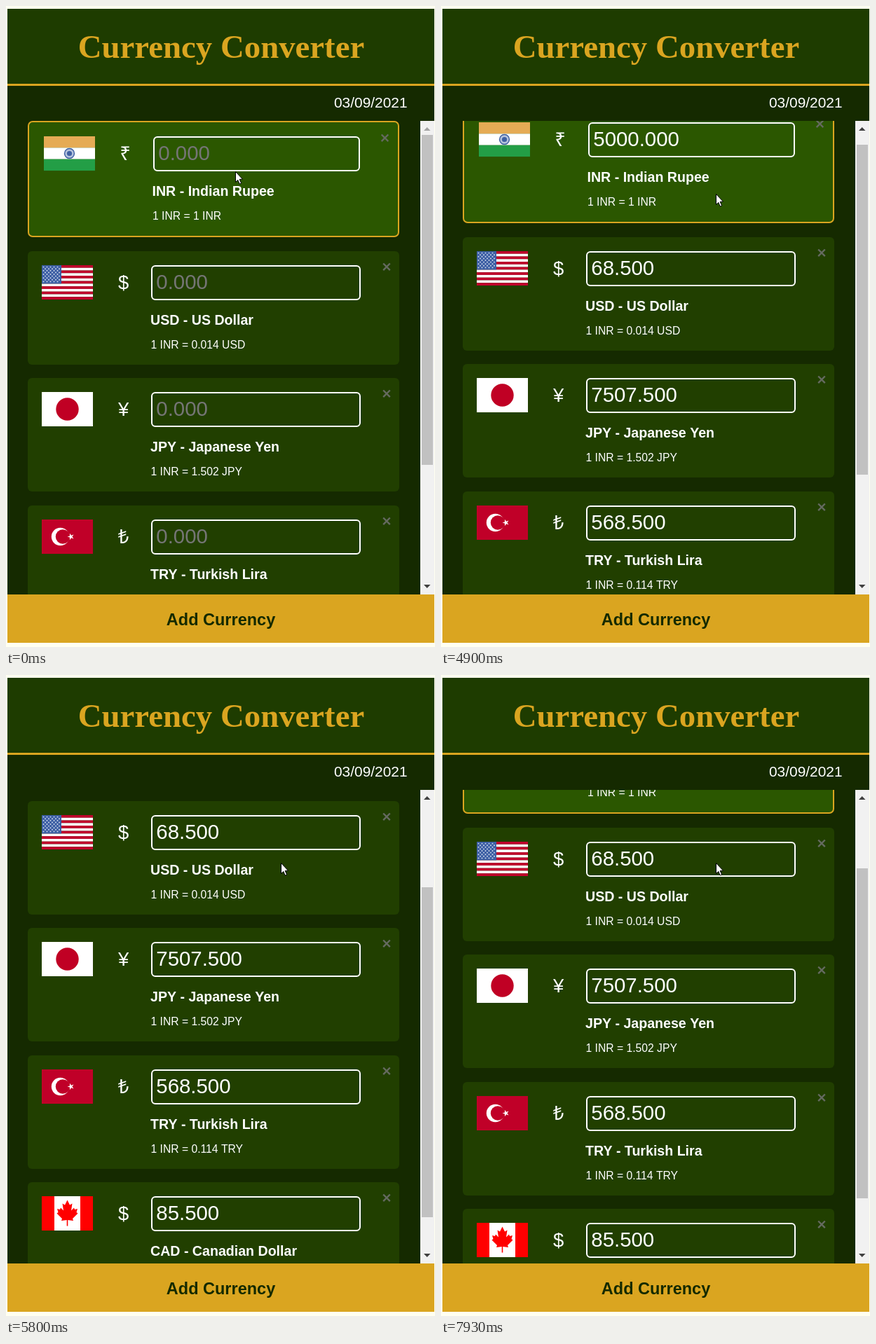
An HTML page with a canvas that plays this animation: 612x915 px, repeating every 8000 ms.

```html
<!DOCTYPE html>
<html lang="en">
<head>
<meta charset="utf-8">
<title>Currency Converter</title>
<style>
html, body { margin: 0; width: 100%; height: 100%; overflow: hidden; background: #fffff0; }
canvas { display: block; }
</style>
</head>
<body>
<canvas id="stage" width="612" height="915"></canvas>
<script>
const ctx = document.getElementById('stage').getContext('2d');
const LOOP = 8000, TICK = 70;
const GOLD = '#daa520', DARK = '#152a00', WHITE = '#fff';
const SANS = '"Liberation Sans", Arial, "Noto Sans", "DejaVu Sans", sans-serif';
const TITLE = '"Liberation Serif", "Noto Serif", serif';
const LIST_TOP = 164, LIST_END = 840, PITCH = 181.5;

const cards = [
  { sign: '₹', code: 'INR', name: 'Indian Rupee', rate: 1, label: '1', flag: india },
  { sign: '$', code: 'USD', name: 'US Dollar', rate: 0.0137, label: '0.014', flag: usa },
  { sign: '¥', code: 'JPY', name: 'Japanese Yen', rate: 1.5015, label: '1.502', flag: japan },
  { sign: '₺', code: 'TRY', name: 'Turkish Lira', rate: 0.1137, label: '0.114', flag: turkey },
  { sign: '$', code: 'CAD', name: 'Canadian Dollar', rate: 0.0171, label: '0.017', flag: canada }
];

// ---------- drawing helpers ----------
function rect(x, y, w, h, color) {
  ctx.fillStyle = color;
  ctx.fillRect(x, y, w, h);
}

function round(x, y, w, h, r, fill, stroke, line = 2) {
  ctx.beginPath();
  ctx.roundRect(x, y, w, h, r);
  if (fill) { ctx.fillStyle = fill; ctx.fill(); }
  if (stroke) { ctx.strokeStyle = stroke; ctx.lineWidth = line; ctx.stroke(); }
}

function disc(x, y, r, color) {
  ctx.beginPath();
  ctx.arc(x, y, r, 0, 2 * Math.PI);
  ctx.fillStyle = color;
  ctx.fill();
}

function poly(points, fill, stroke) {
  ctx.beginPath();
  points.forEach(([x, y]) => ctx.lineTo(x, y));
  ctx.closePath();
  ctx.fillStyle = fill;
  ctx.fill();
  if (stroke) { ctx.strokeStyle = stroke; ctx.lineWidth = 1; ctx.stroke(); }
}

function text(s, x, y, size, color = WHITE, weight = 'normal', align = 'left', family = SANS) {
  ctx.font = `${weight} ${size}px ${family}`;
  ctx.textAlign = align;
  ctx.fillStyle = color;
  ctx.fillText(s, x, y);
}

// ---------- flags, each 73 x 49 ----------
function india() {
  rect(0, 0, 73, 16.3, '#e5ab55');
  rect(0, 16.3, 73, 16.4, WHITE);
  rect(0, 32.7, 73, 16.3, '#239e46');
  disc(36.5, 24.5, 7.7, '#3f61a3');
  disc(36.5, 24.5, 6.2, '#b4c2dc');
  disc(36.5, 24.5, 3.6, '#3f61a3');
}

function usa() {
  const h = 49 / 13;
  for (let i = 0; i < 13; i++) rect(0, i * h, 73, h, i % 2 ? WHITE : '#c1002c');
  rect(0, 0, 28, 7 * h, '#3d5fa4');
  for (let row = 0; row < 9; row++)
    for (let x = row % 2 ? 5 : 2.5; x < 27; x += 5) disc(x, 2.6 + row * 2.6, 0.95, '#d5deec');
}

function japan() {
  rect(0, 0, 73, 49, WHITE);
  disc(36.5, 24.5, 16.2, '#c00024');
}

function turkey() {
  rect(0, 0, 73, 49, '#c00028');
  disc(26.5, 24.5, 12.7, WHITE);
  disc(30, 24.5, 10.2, '#c00028');
  const star = [];
  for (let i = 0; i < 10; i++) {
    const a = Math.PI + i * Math.PI / 5, r = i % 2 ? 1.9 : 5;
    star.push([41.5 + r * Math.cos(a), 24.5 + r * Math.sin(a)]);
  }
  poly(star, WHITE);
}

function canada() {
  rect(0, 0, 73, 49, '#f00');
  rect(18, 0, 37, 49, WHITE);
  const half = [[0, -19], [3.5, -12], [7, -14], [5.5, -4], [9.5, -8], [10.5, -5.5], [14.5, -6.5],
    [13, -1.5], [15, 0], [7.5, 7.5], [8.5, 10.5], [0.8, 9.6], [0.8, 18]];
  const mirror = half.map(([x, y]) => [-x, y]).reverse();
  poly([...half, ...mirror].map(([x, y]) => [36.5 + x, 24.5 + y]), '#f00');
}

// ---------- state from time ----------
// Progress 0..1 in n equal jumps, the first one at `start`.
function jumps(t, start, n) {
  return Math.max(0, Math.min(n, Math.floor((t - start) / TICK) + 1)) / n;
}

function scrollAt(t) {
  return 50 * jumps(t, 4820, 5) + 120 * jumps(t, 5170, 10)
    + 66 * jumps(t, 6460, 3) - 104 * jumps(t, 7720, 4);
}

function mouseAt(t) {
  const ease = k => 1 - (1 - k) ** 1.2;
  const a = ease(jumps(t, 70, 6)), b = ease(jumps(t, 4020, 6));
  return { x: Math.round(327 - 18 * a + 83 * b), y: Math.round(236 - 24 * a + 56 * b) };
}

function typedAt(t) {
  const count = [1440, 1970, 2370, 2770].filter(k => t >= k).length;
  return '5000'.slice(0, count);
}

// ---------- scene ----------
function field(x, y, w, value, focused) {
  if (focused) {
    round(x + 1, y + 1, w - 2, 48, 4, null, '#101010');
    round(x - 0.5, y - 0.5, w + 1, 51, 5, null, WHITE, 1);
  } else {
    round(x + 1, y + 1, w - 2, 48, 5, null, WHITE);
  }
  text(value || '0.000', x + 7.3, y + 34, 29.4, value ? WHITE : '#757575');
}

// Draws a card whose top edge sits on the whole pixel `top`.
function drawCard(card, active, top, t) {
  const typed = typedAt(t), focused = active && t >= 620 && t < 3230;
  const dx = active ? 2.5 : 0, dy = active ? 2 : 0;
  if (active) round(32, top + 1, 528, 164, 6, '#2b5700', GOLD);
  else round(31, top, 530, 162, 6, '#213f00');

  ctx.save();
  ctx.translate(Math.round(51 + dx), top + 20 + dy);
  card.flag();
  ctx.restore();

  text(card.sign, 167.5 + dx, top + 54 + dy, 27.4, WHITE, 'normal', 'center');

  const value = !typed ? '' : focused ? typed : (typed * card.rate).toFixed(3);
  field(Math.round(207 + dx), top + 20 + dy, active ? 295 : 299, value, focused);
  const blinkOn = t >= 690 && t < 1220 || t >= 1440;
  if (focused && blinkOn) rect(217 + Math.round(typed.length * 16.35), top + 31, 1, 32, WHITE);

  text(`${card.code} - ${card.name}`, 206 + dx, top + 105 + dy, 19.6, WHITE, 'bold');
  text(`1 INR = ${card.label} ${card.code}`, 206.5 + dx, top + 139 + dy, 15.7);

  const x = 543 - dx, y = top + 22.3 + dy, r = 4.8;
  ctx.beginPath();
  ctx.moveTo(x - r, y - r); ctx.lineTo(x + r, y + r);
  ctx.moveTo(x + r, y - r); ctx.lineTo(x - r, y + r);
  ctx.strokeStyle = '#656a60';
  ctx.lineWidth = 2.4;
  ctx.stroke();
}

function drawScrollbar(scroll) {
  rect(591, LIST_TOP, 20, LIST_END - LIST_TOP, '#f1f1f1');
  rect(593, Math.round(184 + scroll * 0.699), 16, 471, '#c1c1c1');
  const arrow = (y, dir, color) => poly([[596, y], [605.5, y], [600.7, y - 5 * dir]], color);
  arrow(178, 1, scroll ? '#404040' : '#a3a3a3');
  arrow(826, -1, '#404040');
}

function drawMouse({ x, y }) {
  ctx.save();
  ctx.translate(x, y);
  if (y < 236) {
    rect(0, -7, 1, 14, '#b5bdae');
    for (const side of [-8, 7]) {
      rect(-3, side, 3, 1, '#b5bdae');
      rect(1, side, 3, 1, '#b5bdae');
    }
  } else {
    poly([[0.5, 0.5], [0.5, 15.5], [3.8, 12.4], [6.2, 18], [8.6, 17], [6.2, 11.4], [10.5, 11.2]],
      WHITE, '#000');
  }
  ctx.restore();
}

function draw(t) {
  const scroll = scrollAt(t);
  rect(0, 0, 612, 915, '#fffff0');
  rect(2, 4, 609, 107, '#1e3c00');
  rect(2, 111, 609, 3, GOLD);
  rect(2, 114, 609, 726, DARK);
  text('Currency Converter', 307, 74, 46.8, GOLD, 'bold', 'center', TITLE);
  text('03/09/2021', 468, 145, 20.9);

  ctx.save();
  ctx.beginPath();
  ctx.rect(2, LIST_TOP, 589, LIST_END - LIST_TOP);
  ctx.clip();
  cards.forEach((card, i) => {
    const top = i ? LIST_TOP + 186 + (i - 1) * PITCH : LIST_TOP;
    drawCard(card, i === 0, Math.floor(top - scroll), t);
  });
  ctx.restore();

  drawScrollbar(scroll);
  rect(2, LIST_END, 609, 69, GOLD);
  text('Add Currency', 306.5, 884, 23.5, DARK, 'bold', 'center');
  drawMouse(mouseAt(t));
}

function frame() {
  draw(performance.now() % LOOP);
  requestAnimationFrame(frame);
}
frame();
</script>
</body>
</html>
```
